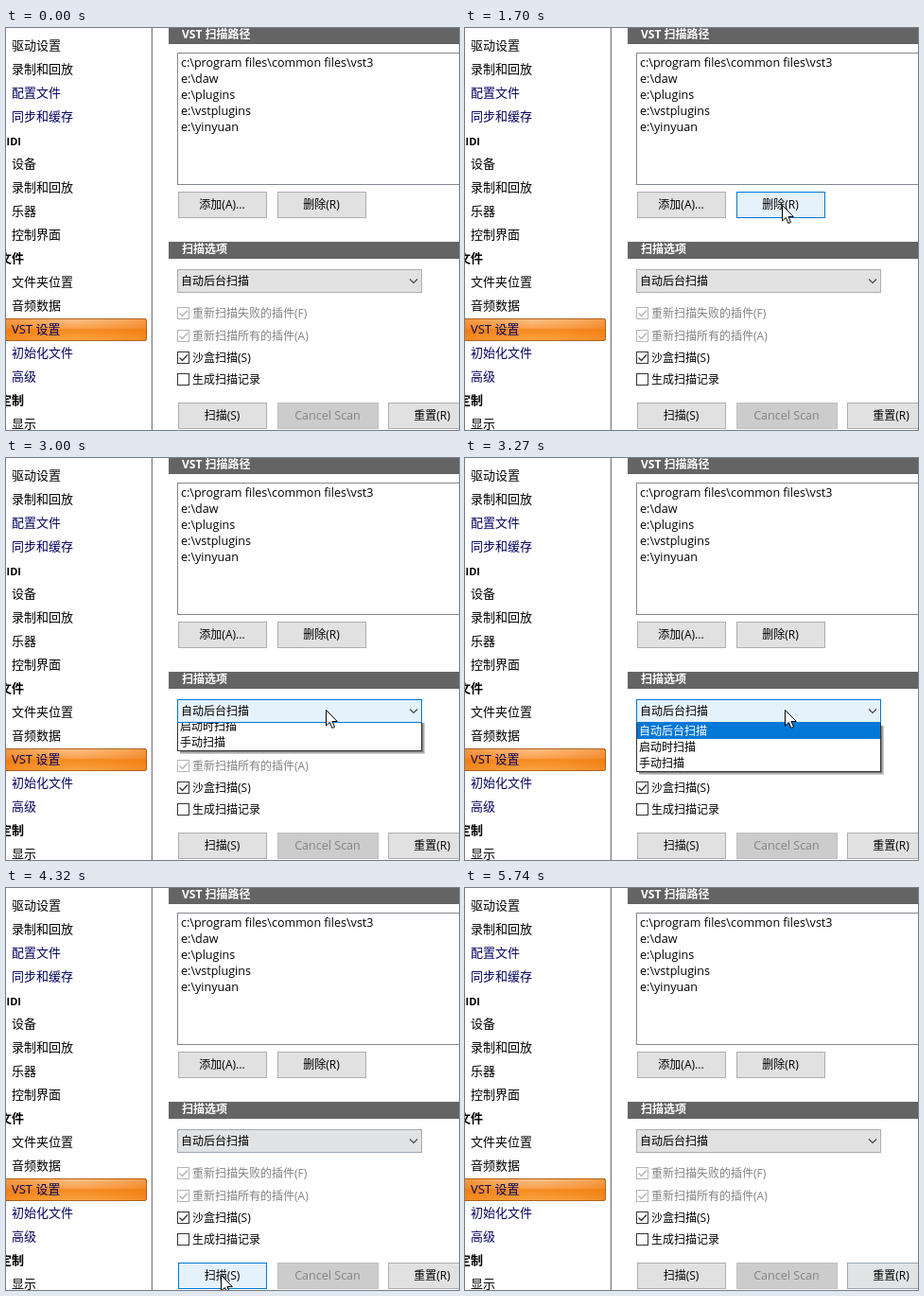
Write an HTML page that moves like this. It is 479x425 px and loops after 5.81 s.

```html
<!DOCTYPE html>
<html lang="zh-CN">
<head>
<meta charset="utf-8">
<title>VST 设置</title>
<style>
html, body { margin: 0; width: 100%; height: 100%; overflow: hidden; background: #fff; }
svg { display: block; width: 479px; height: 425px; }
text { font: 12px "Open Sans", "Noto Sans CJK SC", "Noto Sans CJK", sans-serif; white-space: pre; }
.side { font-size: 13px; }
.paths { font-size: 12.55px; }
.small { font-size: 11px; }
.bold { font-weight: 700; }
</style>
</head>
<body>
<svg id="stage" viewBox="0 0 479 425">
  <defs>
    <linearGradient id="glow" x2="0" y2="1">
      <stop offset="0" stop-color="#fdc289"/>
      <stop offset=".42" stop-color="#f9a352"/>
      <stop offset=".5" stop-color="#f5891f"/>
      <stop offset="1" stop-color="#fba544"/>
    </linearGradient>
    <linearGradient id="edge">
      <stop offset="0" stop-color="#ee6f00" stop-opacity=".55"/>
      <stop offset=".5" stop-color="#f5891f" stop-opacity="0"/>
      <stop offset="1" stop-color="#ee6f00" stop-opacity=".45"/>
    </linearGradient>
    <clipPath id="drop"><rect id="window" x="178" y="280" width="270" height="0"/></clipPath>
  </defs>
</svg>
<script>
const LOOP = 5810, STEP = 70, LIST_H = 52;
const stage = document.getElementById('stage');

function add(tag, attrs, parent = stage) {
  const el = document.createElementNS('http://www.w3.org/2000/svg', tag);
  for (const key in attrs) el.setAttribute(key, attrs[key]);
  parent.append(el);
  return el;
}

function label(str, x, y, opts = {}, parent = stage) {
  const el = add('text', { x, y, ...opts }, parent);
  el.textContent = str;
  return el;
}

// Crisp one-pixel frame covering x..x+w, y..y+h
function frame(x, y, w, h, fill, stroke, parent = stage) {
  return add('rect', { x: x + .5, y: y + .5, width: w - 1, height: h - 1, fill, stroke }, parent);
}

function button(str, x, y, w, off) {
  const box = frame(x, y, w, 28, off ? '#cccccc' : '#e1e1e1', off ? '#bfbfbf' : '#adadad');
  label(str, x + w / 2 - .5, y + 18, {
    'text-anchor': 'middle', fill: off ? '#838383' : '#000', class: off ? 'paths' : ''
  });
  return box;
}

function check(str, y, on, off) {
  const ink = off ? '#b4b4b4' : '#333';
  frame(181, y, 13, 13, '#fff', ink);
  if (on) add('path', { d: `M183.5 ${y + 6.5}l3 3 5.5-6`, fill: 'none', stroke: ink, 'stroke-width': 1.4 });
  label(str, 197, y + 11, { fill: off ? '#838383' : '#000' });
}

// Sidebar
add('rect', { x: 153, y: 0, width: 1, height: 425, fill: '#dcdce0' });
add('rect', { x: 154, y: 0, width: 1, height: 425, fill: '#7f7f86' });
for (const fill of ['url(#glow)', 'url(#edge)'])
  add('rect', { x: -4.5, y: 307.5, width: 153, height: 23, rx: 2, fill, stroke: '#b0601c' });

const NAVY = '#00005f';
const side = [
  '驱动设置', '录制和回放', '*配置文件', '*同步和缓存', '#MIDI', '设备', '录制和回放', '乐器', '控制界面',
  '#文件', '文件夹位置', '音频数据', '*VST 设置', '*初始化文件', '*高级', '#定制', '显示'
];
side.forEach((item, i) => {
  const y = 23 + i * 25;
  const name = item.replace(/^[*#]/, '');
  if (name === 'MIDI') label(name, 16, y + 1, { class: 'small bold', 'text-anchor': 'end' });
  else if (item[0] === '#') label(name, 19, y, { class: 'side bold', 'text-anchor': 'end' });
  else label(name, 6, y, { class: 'side', fill: item[0] === '*' ? NAVY : '#000' });
});

// Right panel
function header(str, y, h) {
  add('rect', { x: 172, y, width: 307, height: h, fill: '#646464' });
  label(str, 186, y + h - 6, { fill: '#fff', class: 'bold' });
}
header('VST 扫描路径', -1, 18);
header('扫描选项', 226, 18);

frame(181, 26, 320, 140, '#fff', '#828790');
['c:\\program files\\common files\\vst3', 'e:\\daw', 'e:\\plugins', 'e:\\vstplugins', 'e:\\yinyuan']
  .forEach((str, i) => label(str, 185, 41 + i * 17, { class: 'paths' }));

const boxes = {
  add: button('添加(A)...', 182, 173, 94),
  remove: button('删除(R)', 287, 173, 94),
  combo: frame(181, 255, 259, 25, '#e1e1e1', '#adadad'),
  scan: button('扫描(S)', 182, 396, 94),
  reset: button('重置(R)', 404, 396, 94)
};
button('Cancel Scan', 287, 396, 107, true);
label('自动后台扫描', 185, 272);
add('path', { d: 'M427 265.5l4 4 4-4', fill: 'none', stroke: '#444', 'stroke-width': 1.1 });

check('重新扫描失败的插件(F)', 295, true, true);
check('重新扫描所有的插件(A)', 319, true, true);
check('沙盒扫描(S)', 342, true);
check('生成扫描记录', 365);

// Drop-down list
const clip = add('g', { 'clip-path': 'url(#drop)' });
const list = add('g', {}, clip);
add('rect', { x: 184, y: 283, width: 259, height: LIST_H, fill: '#000', opacity: .2 }, list);
add('rect', { x: 184, y: 283, width: 257.5, height: LIST_H - 1.5, fill: '#000', opacity: .35 }, list);
frame(181, 279, 259, LIST_H + 1, '#fff', '#333', list);
add('rect', { x: 182, y: 280, width: 257, height: 17, fill: '#0078d7' }, list);
['自动后台扫描', '启动时扫描', '手动扫描'].forEach((str, i) =>
  label(str, 184, 293 + i * 17, { fill: i ? '#000' : '#fff' }, list));

const cursor = add('path', {
  d: 'M0 0V16.5L3.8 13 6.4 19 9 17.9 6.5 12H11.8Z', fill: '#fff', stroke: '#000', 'stroke-width': 1
});

// Pointer strokes: start, end, from, to
const moves = [
  [260, 750, 303, 336, 246, 188],
  [1420, 1700, 261, 188, 335, 187],
  [2100, 2590, 335, 192, 338, 266],
  [3550, 3900, 327, 282, 227, 409],
  [4720, 4930, 257, 410, 479, 416]
];
// Hover fades: in from, in to, out from, out to
const hovers = {
  add: [[610, 750, 1420, 1630]],
  remove: [[1490, 1700, 2170, 2450]],
  combo: [[330, 400, 470, 680], [2450, 2730, 3550, 4390]],
  scan: [[3760, 4110, 4720, 5200]],
  reset: [[4790, 5000, 5400, 5740]]
};

const clamp = v => Math.min(1, Math.max(0, v));
const ramp = (t, a, b) => clamp((t - a) / (b - a));
const lerp = (a, b, k) => a + (b - a) * k;
const mix = (a, b, k) => `rgb(${a.map((v, i) => Math.round(lerp(v, b[i], k)))})`;

function draw(now) {
  const t = now % LOOP;
  const move = moves.filter(m => m[0] <= t).pop();
  const shown = move && t < 4930;
  cursor.style.display = shown ? '' : 'none';

  // Motion advances in even ticks counted from each stroke's start
  const tick = move ? move[0] + Math.floor((t - move[0]) / STEP) * STEP : 0;
  if (shown) {
    const k = ramp(tick, move[0], move[1]);
    const e = k * (2 - k) * .4 + k * .6;
    const x = Math.round(lerp(move[2], move[4], e));
    const y = Math.round(lerp(move[3], move[5], e));
    cursor.setAttribute('transform', `translate(${x + .5} ${y + .5})`);
  }

  for (const name in hovers) {
    const k = Math.max(...hovers[name].map(([a, b, c, d]) => ramp(tick, a, b) * (1 - ramp(tick, c, d))));
    boxes[name].setAttribute('fill', mix([225, 225, 225], [229, 241, 251], k));
    boxes[name].setAttribute('stroke', mix([173, 173, 173], [0, 120, 215], k));
  }

  const open = t >= 2930 && t < 3350;
  const h = open ? Math.min(LIST_H, 15 * (1 + Math.floor((t - 2930) / STEP))) : 0;
  clip.style.display = open ? '' : 'none';
  document.getElementById('window').setAttribute('height', open ? h + 4 : 0);
  list.setAttribute('transform', `translate(0 ${h - LIST_H})`);
}

const start = performance.now();
function loop() {
  draw(performance.now() - start);
  requestAnimationFrame(loop);
}
loop();
</script>
</body>
</html>
```
